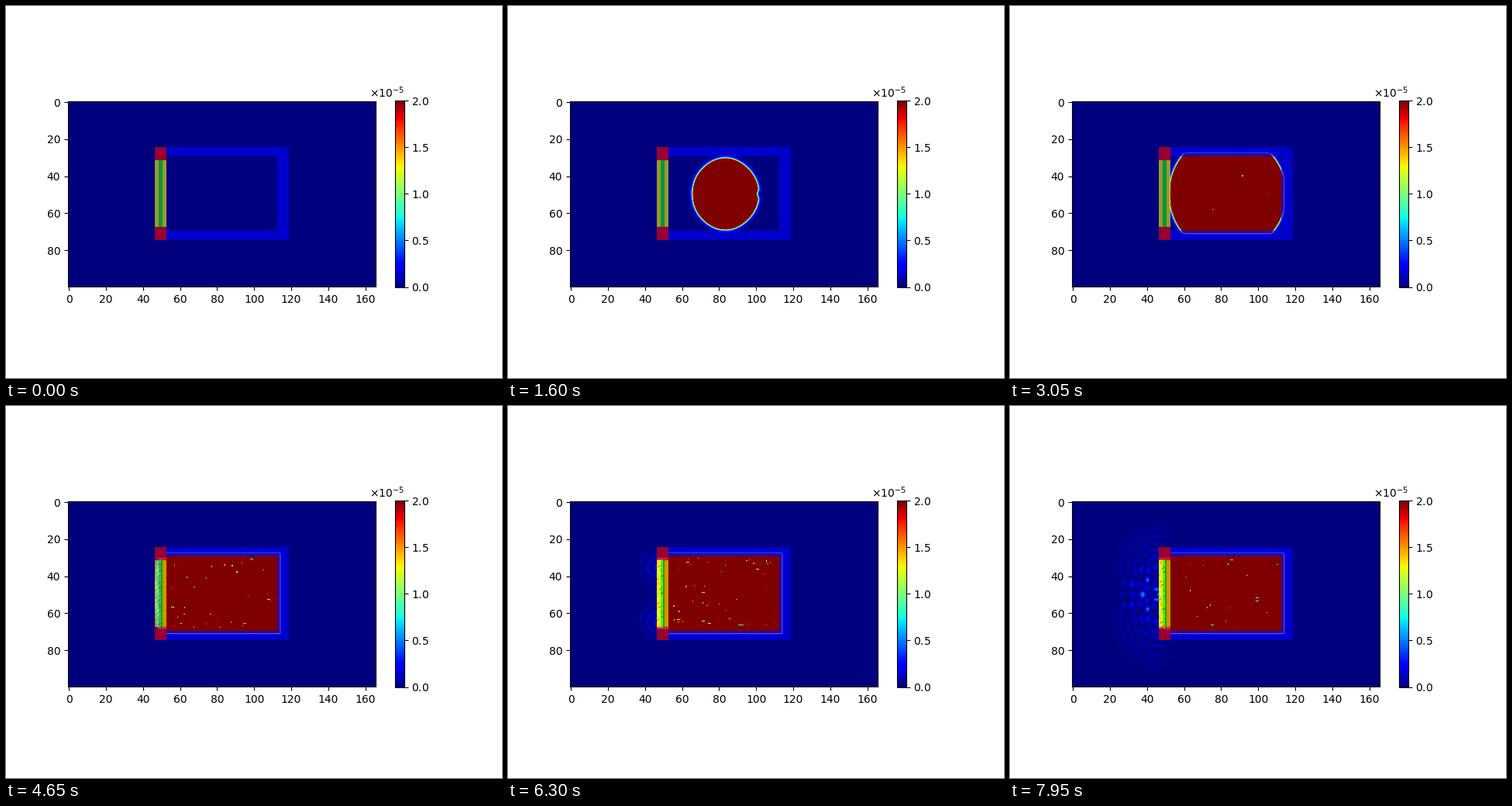
Animation of 640 by 480 pixels, one loop 8000 ms. Source, as a matplotlib script:

```python
import numpy as np
import matplotlib.pyplot as plt
from matplotlib.animation import FuncAnimation
from matplotlib.ticker import ScalarFormatter

FRAMES, STEP = 160, 50
ROWS, COLS = 100, 166
VMAX = 2e-5
PX = 2.39                     # screen pixels per cell
W, H = 397, 239
EXTENT = (-0.5, COLS - 0.5, ROWS - 0.5, -0.5)

x, y = np.meshgrid((np.arange(W) + 0.5) / W * COLS - 0.5,
                   (np.arange(H) + 0.5) / H * ROWS - 0.5)

# Cavity geometry, in cells
CX, CY = 83.3, 49.7           # emitter
OUT, MIR = 46.5, 52.5         # both faces of the left mirror
depth = np.clip(MIR - x, 0, None)
dx, dy = np.maximum(x, MIR) - CX, y - CY
dist = np.hypot(dx, dy)
path = dist + 2.5 * depth     # light is slower inside the mirror
sin_a, cos_a = dy / (dist + 1e-9), dx / (dist + 1e-9)

half = np.where(x > MIR, 21.2, 18.2)
wall = np.maximum(np.abs(y - 49.4) - half, 0) + np.maximum(x - 113.7, 0)
beyond = np.abs(y - 49.5) > 25
outside = (x < OUT) | beyond
shade = np.exp(-np.clip(x - OUT, 0, None) / 6)
face = (x >= OUT) & (x < 49.5) & (np.abs(y - 49.5) < 18.2)

# Emitters on the mirror face: row, wave number, strength, start time
EMITTERS = [(35.5, 0.84, 1.0, 4.6), (64.5, 0.84, 1.0, 4.6),
            (50.0, 0.95, 0.8, 5.6), (42.0, 1.3, 0.7, 6.3), (58.0, 1.3, 0.7, 6.3)]


def cavity(t):
    radius = 2.7 + 9.37 * t - 2.4 * np.exp(-t / 0.15)
    shape = 1.1 * sin_a ** 6 - 0.4 * np.clip(-cos_a, 0, 1) ** 8
    shape = shape - 0.9 * np.exp(-(dy / 1.7) ** 2) * (dx > 0)
    front = path - radius - shape * min(1, t / 1.2)
    return np.exp(-np.maximum(front, 0) / 0.6 - wall / 0.35) * 1.2


def mirror_glow(t):
    level = np.interp(t, [4.2, 4.65, 5.5, 8], [0.1, 0.24, 0.62, 0.64])
    ripple = (np.sin(1.3 * y + 7 * t) * np.sin(0.7 * y - 5 * t + 1.5 * x)
              + 0.5 * np.sin(2.9 * y + 2 * x - 11 * t))
    return level * (1 + 0.35 * ripple)


def leak(t):
    wave = np.zeros_like(x)
    for row, k, amp, start in EMITTERS:
        r = np.hypot(x - OUT, y - row)
        reach = 9.6 * (t - start)
        gate = np.clip((reach - r) / 10, 0, 1)
        wave += amp * gate * np.cos(k * (r - reach)) / np.sqrt(1 + r / 7)
    return np.minimum(0.1 * wave ** 2, 0.25) * shade


def add_specks(v, n, t):
    count = int(np.interp(t, [2.85, 3.05, 4.65, 6.3, 7.05, 7.95],
                          [0, 6, 42, 58, 42, 18]))
    if not count:
        return
    rng = np.random.default_rng(n)
    hub = rng.uniform(58, 108), rng.uniform(33, 66)
    for i in range(count):
        px = rng.uniform(54, 111)
        py = rng.uniform(31, 68)
        if i % 3 == 0:
            py = rng.choice([33, 66]) + rng.normal(0, 1.2)
        elif i % 7 == 1:
            px, py = np.array(hub) + rng.normal(0, 1.3, 2)
        wide = rng.choice([1, 1, 1, 2, 2, 4])
        tall = rng.choice([1, 1, 2]) if wide < 4 else 1
        c, r = int((px + 0.5) * PX), int((py + 0.5) * PX)
        v[r:r + tall, c:c + wide] = rng.choice([0.4, 0.55, 0.65, 0.75, 0.9, 0.93])


def field(n):
    t = n * STEP / 1000
    if n == 0:
        return np.zeros_like(x)
    v = cavity(t)
    v = np.where(face, np.minimum(v, mirror_glow(t)), v)
    v = np.where(outside, leak(t), v)
    add_specks(v, n, t)
    return v * VMAX


def overlay():
    img = np.zeros((ROWS, COLS, 4))
    a = 0.6
    img[25:75, 47:119] = 0, 0, 1, a
    img[30:70, 53:113] = 0
    img[25:75, 47:53] = 1, 0, 0, a
    img[32:68, 47:53] = 1, 1, 0, a
    img[32:68, 49:51] = 0, 1, 0, a
    return img


fig, ax = plt.subplots(figsize=(6.4, 4.8), dpi=100)
im = ax.imshow(field(0), cmap="jet", vmin=0, vmax=VMAX, extent=EXTENT,
               interpolation="nearest")
ax.imshow(overlay(), extent=EXTENT, interpolation="nearest")

fmt = ScalarFormatter(useMathText=True)
fmt.set_powerlimits((0, 0))
fig.colorbar(im, ax=ax, shrink=0.65, format=fmt, ticks=np.arange(5) * 0.5e-5)


def update(n):
    im.set_data(field(n))
    return [im]


anim = FuncAnimation(fig, update, frames=FRAMES, interval=STEP,
                     repeat=True, repeat_delay=0)
plt.show()
```
